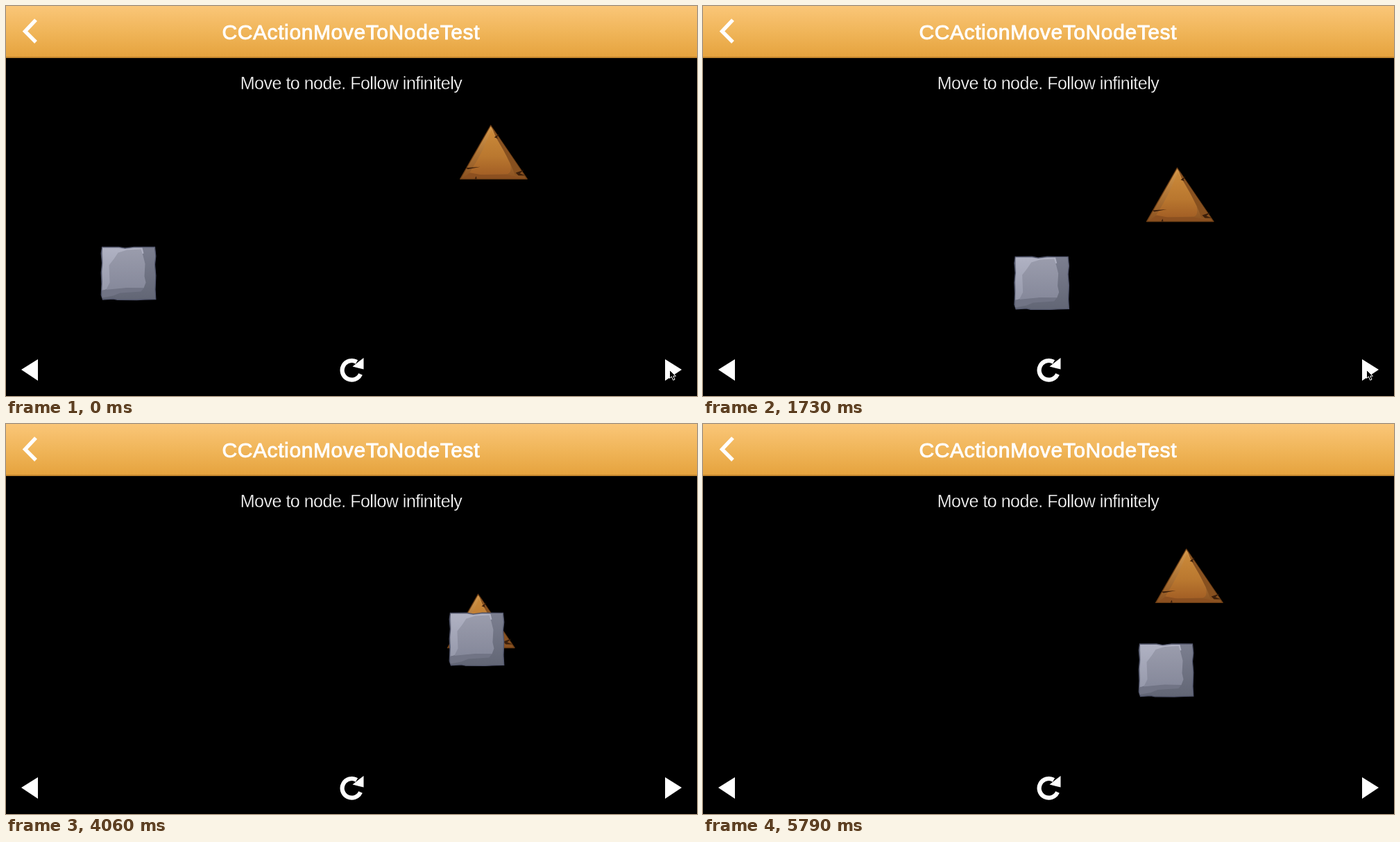
Write an HTML page that moves like this. It is 996 by 562 pixels and loops after 5870 ms.

```html
<!DOCTYPE html>
<html lang="en">
<head>
<meta charset="utf-8">
<title>CCActionMoveToNodeTest</title>
<style>
  html, body { margin: 0; width: 100%; height: 100%; overflow: hidden; background: #000; }
  svg { display: block; width: 996px; height: 562px; }
  text { font-family: "Liberation Sans", Arial, sans-serif; fill: #fff; text-anchor: middle; }
  .title { font-size: 30px; letter-spacing: .6px; stroke: #fff; stroke-width: .9px; }
  /* A black outline on black thins the letters. */
  .hint { font-size: 25px; letter-spacing: -.5px; stroke: #000; stroke-width: .3px; }
</style>
</head>
<body>
<svg viewBox="0 0 996 562">
  <defs>
    <linearGradient id="bar" x2="0" y2="1">
      <stop stop-color="#fac678"/><stop offset=".5" stop-color="#f0b559"/><stop offset="1" stop-color="#e5a23d"/>
    </linearGradient>
    <linearGradient id="wood" x2="0" y2="1">
      <stop stop-color="#cb8a3a"/><stop offset=".6" stop-color="#b9772f"/><stop offset="1" stop-color="#a35f25"/>
    </linearGradient>
    <linearGradient id="woodEdge" x2="0" y2="1">
      <stop stop-color="#d69a4d"/><stop offset="1" stop-color="#8a5120"/>
    </linearGradient>
    <linearGradient id="stone" x2="0" y2="1">
      <stop stop-color="#9a9cac"/><stop offset="1" stop-color="#85889a"/>
    </linearGradient>
    <linearGradient id="stoneLight" x2="0" y2="1">
      <stop stop-color="#b0b2c3"/><stop offset="1" stop-color="#9699ab"/>
    </linearGradient>
    <linearGradient id="stoneDark" x2="0" y2="1">
      <stop stop-color="#7c7f90"/><stop offset="1" stop-color="#626675"/>
    </linearGradient>
  </defs>

  <rect width="996" height="562"/>
  <rect width="996" height="75" fill="url(#bar)"/>
  <rect y="73" width="996" height="2" fill="#c4872f"/>
  <path d="M43 20 27.5 36.5 43 52" fill="none" stroke="#fff" stroke-width="5.4"/>
  <text class="title" x="497.3" y="48">CCActionMoveToNodeTest</text>
  <text class="hint" x="497.5" y="120">Move to node. Follow infinitely</text>

  <!-- origin at the centre -->
  <g id="triangle">
    <g transform="translate(-4.5 -39.5)">
      <path d="M0 .8 52.5 78H-44z" fill="url(#woodEdge)" stroke="#6a3c14" stroke-width="1.3" stroke-linejoin="round"/>
      <path d="M2 5 50 76 35 72Q29 56 18 36L7 17z" fill="#87501f"/>
      <path d="M1 7 8 20Q19 37 28 56 31 69 24 71L-16 72-31 70Q-20 53-11 35z" fill="url(#wood)"/>
      <path d="M-40 77-30 69-14 72 24 72 50 77z" fill="#8c5020"/>
      <path d="M-36 62-15 60.5-33 64zM-23 78-21 74-20 78zM36 69 48 65 42 70 50 73 40 73zM5 18 12 13 9 18 11 20z" fill="#3c1f0b"/>
    </g>
  </g>

  <!-- origin at the centre -->
  <g id="square">
    <g transform="translate(-40 -38.5)">
      <path d="M2 1 26 .8 35 2.5 48 .8 78 1 79.3 14 78 26 79.3 42 78.5 62 79.3 76 62 76.5 52 77 24 76.8 18 75.5 3 76.5.8 70 1.5 54 .8 38 2 24 .8 10z"
        fill="url(#stoneDark)" stroke="#50546a" stroke-width="1.3"/>
      <path d="M2.5 2 26 2 35 3.5 48 2 60 2 62 10 50 14 20 52 12 60 2 64 2.5 50 2 36 3 24z" fill="url(#stoneLight)"/>
      <path d="M12 27 19 18 25 9 38 5 58 4 61 13 64 25 63 43 65 52 62 60 38 60 22 62 7 64 13 52z" fill="url(#stone)"/>
      <path d="M2 63 22 61 38 59.5 62 60 58 65 28 67 18 71 2 74z" fill="#717485"/>
    </g>
  </g>

  <path d="M22 524 46 509V540zM974 524 950 509V540z" fill="#fff"/>
  <path d="M511 530.5A13.8 13.8 0 1 1 505.5 513" fill="none" stroke="#fff" stroke-width="6.2"/>
  <path d="M515.5 507V523.5L499.5 519.5z" fill="#fff"/>
  <path id="cursor" transform="translate(956 524)" d="M.5.5V12.5L3.3 10 5.6 15.2 8 14.2 5.8 9.2H9.5z" stroke="#fff"/>
</svg>

<script>
const LOOP = 5870, STEP = 10, SPEED = 0.189, CURSOR_GONE = 1980;
const [triangle, square, cursor] = ["triangle", "square", "cursor"].map(id => document.getElementById(id));

// The triangle shuttles at even speed between two ends, turning at these times.
const upper = { x: 704.2, y: 206.5 }, lower = { x: 613.7, y: 571.5 };
const turns = [-10, 940, 1904, 2870, 3847, 4855, 5824, 6800];

function leader(t) {
  const i = turns.findLastIndex(turn => turn <= t);
  const part = (t - turns[i]) / (turns[i + 1] - turns[i]);
  const k = i % 2 ? 1 - part : part;
  return { x: upper.x + (lower.x - upper.x) * k, y: upper.y + (lower.y - upper.y) * k };
}

// The square always heads straight for the triangle at constant speed.
function chase(start) {
  const path = [start];
  for (let t = 0; t < LOOP; t += STEP) {
    const { x, y } = path.at(-1), goal = leader(t + STEP / 2);
    const dx = goal.x - x, dy = goal.y - y;
    const k = Math.min(1, SPEED * STEP / (Math.hypot(dx, dy) || 1));
    path.push({ x: x + dx * k, y: y + dy * k });
  }
  return path;
}

const path = chase({ x: 176.5, y: 385 });

function place(el, { x, y }) {
  el.setAttribute("transform", `translate(${x.toFixed(2)} ${y.toFixed(2)})`);
}

const start = performance.now();
function draw() {
  const t = (performance.now() - start) % LOOP;
  place(triangle, leader(t));
  place(square, path[Math.round(t / STEP)]);
  cursor.style.display = t < CURSOR_GONE ? "" : "none";
  requestAnimationFrame(draw);
}
draw();
</script>
</body>
</html>
```
